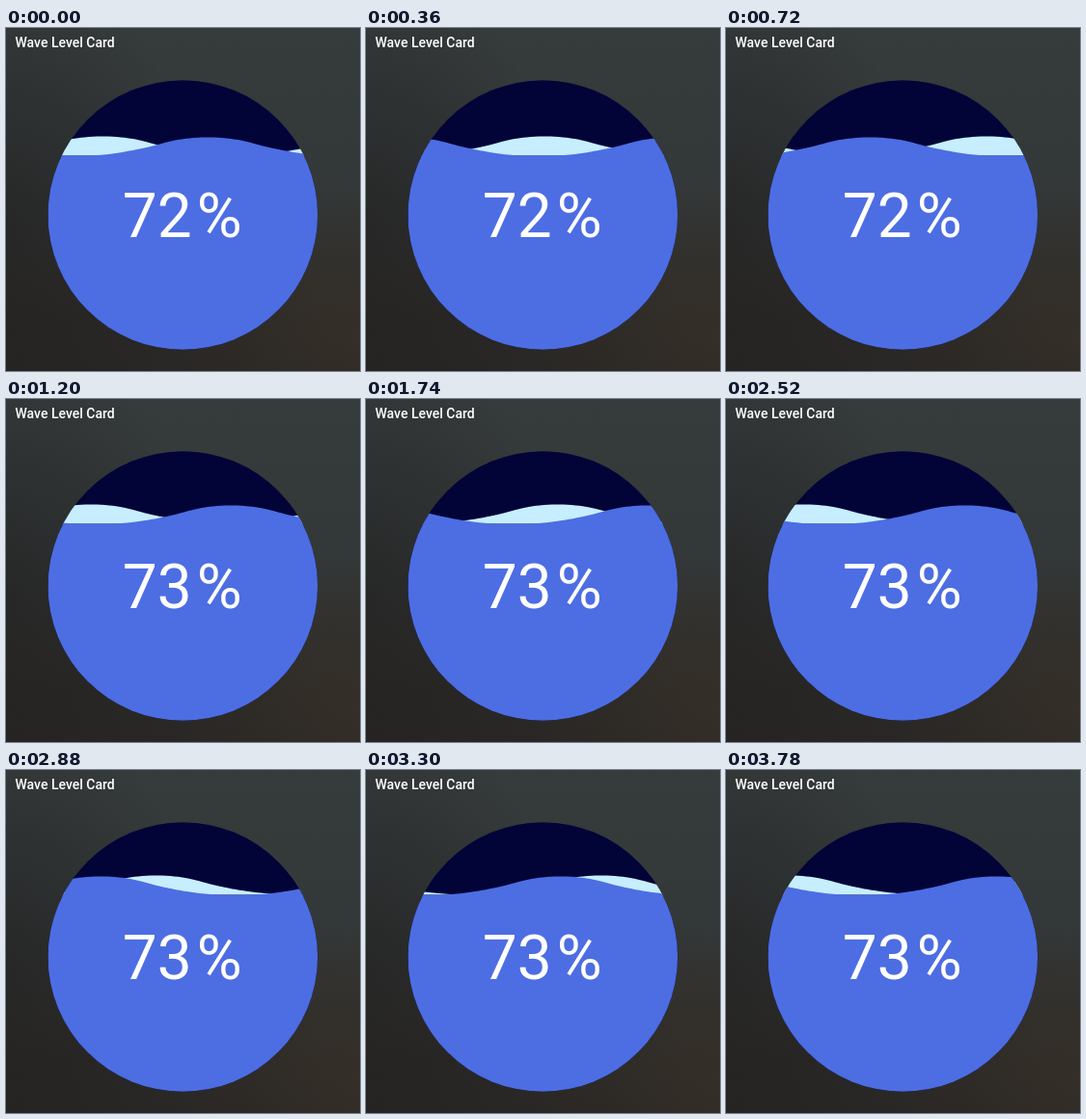
These frames come from a looping animation (367x356 px, 3.84 s). An HTML page:

```html
<!DOCTYPE html>
<html lang="en">
<head>
<meta charset="utf-8">
<title>Wave Level Card</title>
<style>
  html, body { margin: 0; width: 100%; height: 100%; overflow: hidden; }
  body {
    background:
      radial-gradient(ellipse 200px 260px at 0 55%, rgba(28, 26, 25, .5), rgba(28, 26, 25, 0)),
      radial-gradient(ellipse 190px 170px at 100% 90%, rgba(62, 52, 40, .5), rgba(62, 52, 40, 0)),
      linear-gradient(#363b3b 0%, #333839 45%, #2b2927 85%, #292725 100%);
  }
  svg { display: block; }
  text { font-family: Roboto, sans-serif; fill: #fff; }
  .title { font-size: 14px; font-weight: 500; }
  .value { font-size: 64px; }
</style>
</head>
<body>
<svg width="367" height="356" viewBox="0 0 367 356">
  <clipPath id="disc"><circle cx="183.3" cy="194" r="139.8"/></clipPath>
  <text class="title" x="9.5" y="20">Wave Level Card</text>
  <circle cx="183.3" cy="194" r="139.8" fill="#020438"/>
  <g clip-path="url(#disc)">
    <g id="water">
      <path id="back" fill="#c7eeff"/>
      <path id="front" fill="#4d6de3"/>
      <rect width="280" height="280" fill="#4d6de3"/>
    </g>
  </g>
  <text class="value" x="120.8" y="216.5" id="num">72</text>
  <text class="value" x="197.8" y="216.5">%</text>
</svg>
<script>
  const LOOP = 3840, STEP = 60, SIZE = 280, LEFT = 43.3, TOP = 54;
  const RISE_AT = 880, RISE_MS = 300;

  // Drift of the back wave in px over time; the front wave runs back twice as fast.
  const drift = [[0, 57], [720, 227], [1200, 325], [1740, 435.5],
                 [2220, 535.5], [2880, 672.5], [3840, 874]];

  const $ = id => document.getElementById(id);
  const water = $('water'), back = $('back'), front = $('front'), num = $('num');

  const fall = 'c13.6-.1 24.3 1.4 31.5 2.7 10.5 2 14.5 3.8 30.1 7.4 .8 .2 13.9 3.2 27.3 5.4 12.3 2 29.6 4.1 51.1 4.5';
  const climb = 'c21.5-.4 38.8-2.5 51.1-4.5 13.4-2.2 26.5-5.2 27.3-5.4 15.6-3.6 19.6-5.4 30.1-7.4 7.1-1.3 17.9-2.8 31.5-2.7';
  const wave = `M0 -20${(fall + climb).repeat(2)}V0H0z`;
  back.setAttribute('d', wave);
  front.setAttribute('d', wave);

  const move = (el, x, y) => el.setAttribute('transform', `translate(${x} ${y})`);

  function driftAt(t) {
    const i = drift.findIndex(p => p[0] > t);
    const [t0, d0] = drift[i - 1], [t1, d1] = drift[i];
    return d0 + (d1 - d0) * (t - t0) / (t1 - t0);
  }

  function draw(now) {
    const t = Math.floor(now % LOOP / STEP) * STEP;
    const d = driftAt(t);
    const p = Math.min(1, Math.max(0, (t - RISE_AT) / RISE_MS));
    const level = 72 + 1 - (1 - p) ** 2;

    move(water, LEFT, TOP + SIZE * (1 - level / 100));
    move(back, d % SIZE - SIZE, 0);
    move(front, -(2 * d % SIZE), 1);
    num.textContent = t < RISE_AT ? 72 : 73;
  }

  const start = performance.now();
  function tick() {
    draw(performance.now() - start);
    requestAnimationFrame(tick);
  }
  tick();
</script>
</body>
</html>
```
